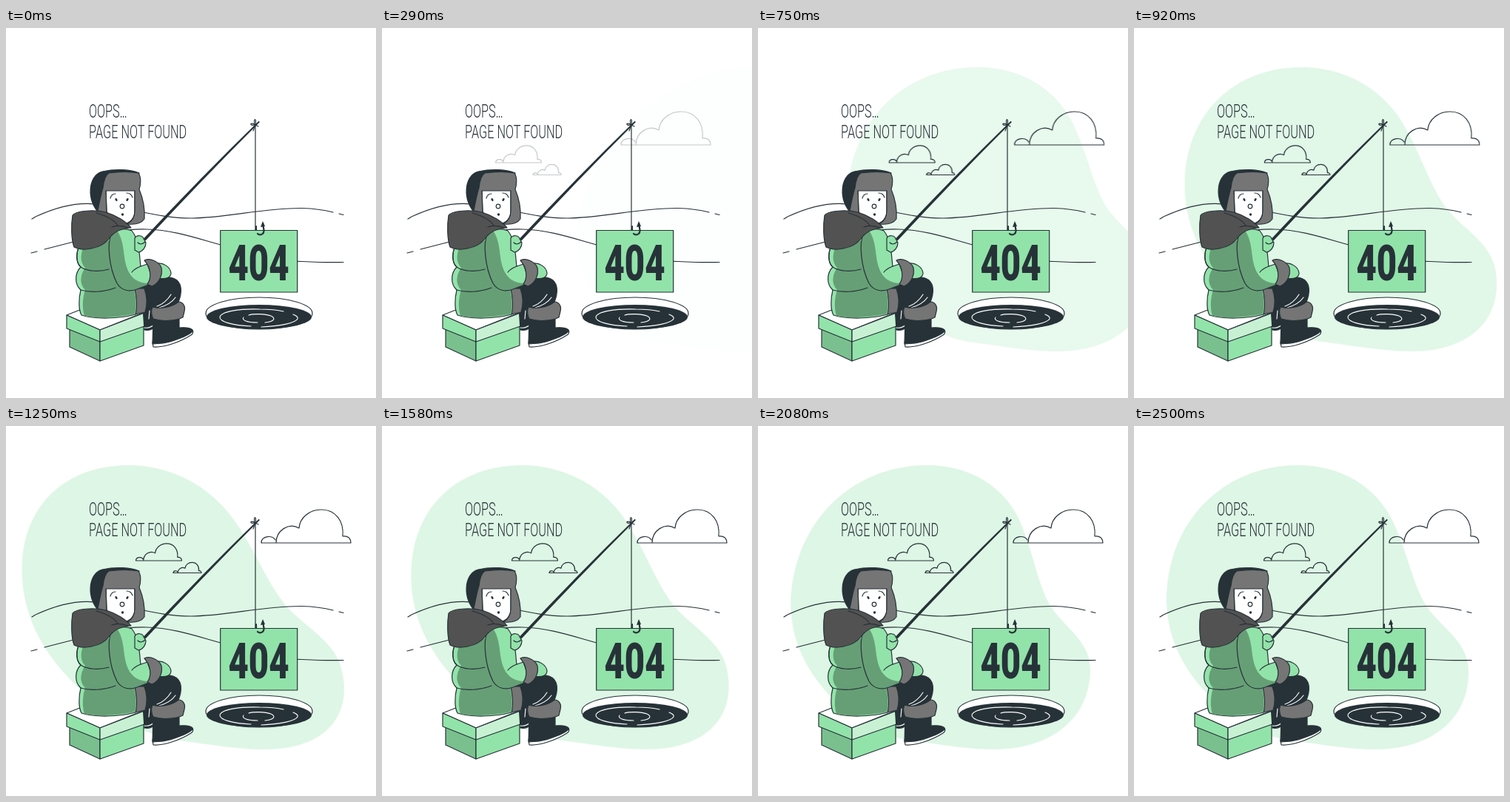
Recreate the animation shown at these times as an HTML page. Size 500x500 px, loop 2710 ms.

```html
<!DOCTYPE html>
<html lang="en">
<head>
<meta charset="utf-8">
<title>Page not found</title>
<style>
  html, body { margin: 0; width: 100%; height: 100%; overflow: hidden; background: #fff; }
  svg { display: block; width: 100vw; height: 100vh; }
  .ln { fill: none; stroke: #263238; stroke-width: 1.2; stroke-linecap: round; stroke-linejoin: round; }
  .sh { stroke: #263238; stroke-width: 1.2; stroke-linejoin: round; }
  .ink { fill: #263238; }
  .green { fill: #92e3a9; }
  .shade { fill: #669f76; }
  .fur { fill: #757575; }
  .white { fill: #fff; }
  .wl { fill: none; stroke: #fff; stroke-width: 1.1; stroke-linecap: round; }
  #blob { fill: #def6e5; transform-origin: 248px 245px; }
  #blob, #clouds { opacity: 0; }
  #cloud { vector-effect: non-scaling-stroke; }
  text { font-family: Roboto, "Open Sans", sans-serif; fill: #263238; }
  .title { font-size: 26.7px; font-weight: 300; }
  .sign { font-size: 67.5px; font-weight: 900; text-anchor: middle; }
</style>
</head>
<body>
<svg viewBox="0 0 500 500">
  <defs>
    <path id="cloud" class="ln" d="M0 0H121C121-7 116-10 110-9C112-30 100-45 81-45C65-45 52-34 51-20C37-28 20-17 20 0M0 0C0-10 16-11 19-4"/>
  </defs>

  <path id="blob" d="M222 53C274 53 318 76 343 116C368 158 374 212 397 246C418 275 452 292 452 332C452 398 400 437 325 437C285 437 240 428 205 424C150 415 46 345 44 238C44 128 122 53 222 53Z"/>

  <g id="clouds">
    <use href="#cloud" transform="translate(345 158)"/>
    <use href="#cloud" transform="translate(175.5 182) scale(.512)"/>
    <use href="#cloud" transform="translate(226 198.5) scale(.314)"/>
  </g>

  <g class="ln">
    <path d="M35 258L40 255M41 254.500C66 243 95 235 121 238C170 243 205 257 250 257C300 257 345 243 400 243.500C417 244 430 246 442 249M450 251L456 252.500"/>
    <path d="M34 304L42 302M52 299L95 288C130 278 160 271 190 272C228 273 260 285 290 293C325 304 355 315 400 315.500C420 316.500 440 317 456 316.500"/>
  </g>

  <g id="hole">
    <ellipse class="sh white" cx="342" cy="385.500" rx="72" ry="21.500"/>
    <ellipse class="ink" cx="342" cy="390.500" rx="71" ry="16.500"/>
    <path class="wl" d="M331 403C307 402 289 397 289 391C290 383 316 379 343 380C356 380 367 381 375 383M388 387C393 389 395 391 394 393C391 399 369 403 345 404M328 388C334 386 350 386 358 389C366 393 361 397 350 398M340 398C326 398 318 395 321 391"/>
  </g>

  <g id="sign">
    <rect class="sh green" x="289.700" y="273.500" width="104" height="83.500"/>
    <text class="sign" transform="translate(341.500 341) scale(.7 1)">404</text>
    <path class="ln" d="M337 131V273"/>
    <path class="ln" stroke-linecap="butt" style="stroke-width:2.200" d="M338 268V273M347 264L348.500 273C349 279 343 281 340 278"/>
    <path class="ink" d="M347 261L350 268L344 269Z"/>
  </g>

  <g id="angler">
    <path class="sh white" d="M82 388L112 376L187 384L127 408Z"/>
    <path class="sh" fill="#7ac08e" d="M86 406L127 423V450L86 431Z"/>
    <path class="sh green" d="M127 423L186 402V429L127 450Z"/>
    <path class="sh green" d="M82 388L127 408V424L82 406Z"/>
    <path class="sh" fill="#c8f1d4" d="M127 408L187 385V403L127 424Z"/>

    <path class="sh ink" d="M185 376H202V403C197 408 191 409 187 408Z"/>
    <path class="wl" d="M187 405C192 406 197 404 201 400M194 382L193 393"/>
    <path class="sh ink" d="M175 352C192 337 224 331 233 343C239 351 236 364 231 375L199 380H178Z"/>
    <path class="wl" d="M204 376C211 374 219 367 223 360M207 378C217 375 225 370 229 364"/>
    <path class="sh white" d="M198 424L199 431C214 432 236 424 250 415C253 413 253 410 252 408Z"/>
    <path class="sh ink" d="M199 393H234V405C245 404 253 406 252 410C246 416 225 424 212 426L198 427Z"/>
    <path class="sh fur" d="M198 377C207 380 224 378 233 370C239 370 243 376 241 383L239 391C229 396 211 397 199 393C196 388 196 381 198 377Z"/>

    <path class="sh fur" d="M172 352H187C191 363 191 374 188 384L174 387Z"/>
    <path class="sh green" d="M99 294C94 306 95 318 101 323C93 331 92 346 101 354C98 366 98 381 102 388C120 394 154 393 175 387C178 376 176 358 173 350L177 286L140 265Z"/>
    <path class="shade" d="M104 298C100 309 101 318 107 324C100 334 99 346 107 354C103 366 103 379 106 389C124 393 153 391 174 386C177 375 175 359 172 351L151 344L139 287Z"/>
    <path class="ln" d="M101 323C110 329 126 330 139 326M101 354C114 358 132 357 148 351M99 294C94 306 95 318 101 323"/>

    <path class="ink" d="M185.500 285L188.500 287.500Q264 206 343 127L341.500 125.700Q262 203 185.500 285Z"/>
    <path class="ln" d="M337 131C329 126 329 133 336 131C334 121 339 121 337 131L334 139M337 131L341 133"/>

    <path class="sh green" d="M204 318C213 317 222 323 223 331C223 337 216 340 207 338Z"/>
    <path class="green" d="M143 277C136 290 139 323 150 345C156 355 167 357 177 353L200 344L191 319L182 322C180 307 181 288 170 274C161 270 149 271 143 277Z"/>
    <path class="shade" d="M143 277C136 290 139 323 150 345C156 355 167 357 177 353L196 345C180 346 168 339 163 323C158 307 160 287 150 274Z"/>
    <path class="ln" d="M143 277C136 290 139 323 150 345C156 355 167 357 177 353L200 344L191 319L182 322C180 307 181 288 170 274C161 270 149 271 143 277Z"/>
    <path class="ln" d="M182 322C177 324 173 326 170 330"/>
    <path class="sh fur" d="M187 314C195 310 207 316 210 324C212 334 207 345 197 349L191 346C197 338 196 324 187 314Z"/>
    <path class="sh green" d="M174 284C177 279 185 280 186 285L189 290C189 296 185 302 179 303L174 300Z"/>
    <path class="ln" d="M178 290C181 293 185 292 188 289"/>

    <path class="sh ink" d="M126 250C109 235 110 199 130 194C148 190 169 191 180 196L172 215L142 248Z"/>
    <path class="sh white" d="M135 218H174V250C172 260 165 265 157 265C146 264 139 255 136 248Z"/>
    <path class="sh fur" d="M139 196C153 194 168 194 179 196C183 202 182 212 180 218C185 230 188 244 187 258C183 264 175 266 164 265C171 261 174 254 174 247V220H135L136 250C131 252 126 252 123 250C126 240 127 228 131 216C132 207 134 199 139 196Z"/>
    <path class="ln" d="M141 230C142 226 145 224 148 224M163 223C167 223 170 226 171 229"/>
    <circle class="ln" cx="157" cy="241" r="2.800"/>
    <ellipse class="ink" cx="149" cy="232" rx="1.300" ry="2.200" transform="rotate(-30 149 232)"/>
    <ellipse class="ink" cx="164" cy="232" rx="1.300" ry="2.200" transform="rotate(30 164 232)"/>
    <circle class="ink" cx="157.500" cy="252" r="1.700"/>

    <path class="sh" fill="#525252" d="M90 253C94 247 119 245 135 249C149 253 163 262 169 270C154 271 145 276 139 285C128 299 103 302 92 296C88 286 88 265 90 253Z"/>
    <path class="ln" d="M122 250C136 254 147 260 151 267M165 270C157 267 150 266 143 269"/>
  </g>

  <g class="title">
    <text transform="translate(112 120.500) scale(.61 1)">OOPS<tspan letter-spacing="-1.5">...</tspan></text>
    <text transform="translate(112 148.500) scale(.61 1)">PAGE NOT FOUND</text>
  </g>
</svg>
<script>
  const LOOP = 2710, DELAY = 40;
  const easing = 'cubic-bezier(.36, -.01, .5, 1.38)';
  const tan = deg => Math.tan(deg * Math.PI / 180);

  // Steps: [ms after the delay, opacity, shift x, skew in degrees]
  const play = (id, steps) => {
    const frame = (offset, [, opacity, x, skew], ease) => ({
      offset, opacity, easing: ease,
      transform: `matrix(1, 0, ${tan(skew)}, 1, ${x}, 0)`
    });
    const last = steps[steps.length - 1];
    document.getElementById(id).animate([
      frame(0, steps[0], 'linear'),
      ...steps.map(s => frame((s[0] + DELAY) / LOOP, s, s === last ? 'linear' : easing)),
      frame(1, last, 'linear')
    ], { duration: LOOP, iterations: Infinity });
  };

  play('blob', [
    [0, 0, 250, -20],
    [1500, 1, 0, 10],
    [2000, 1, 0, -2],
    [2500, 1, 0, 0]
  ]);
  play('clouds', [
    [0, 0, -30, 0],
    [920, 1, 0, 0]
  ]);
</script>
</body>
</html>
```
